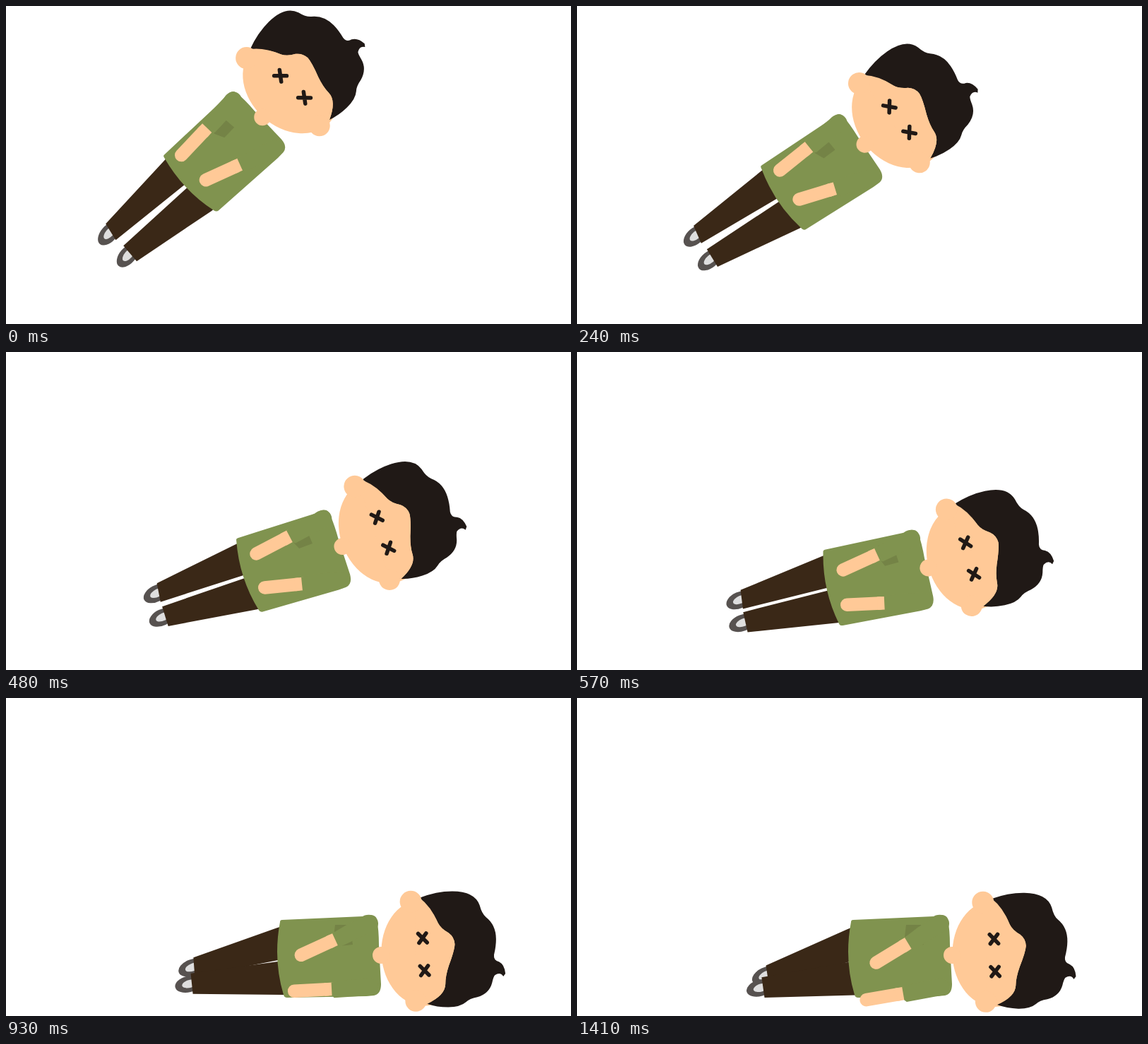
Recreate the animation shown at these times as an HTML page. Size 800x450 px, loop 3330 ms.

```html
<!DOCTYPE html>
<html>
<head>
<meta charset="utf-8">
<style>
  html, body { margin: 0; width: 100%; height: 100%; overflow: hidden; background: #fff; }
  svg { display: block; width: 100%; height: 100%; }
  .skin { fill: #ffc997; }
  .hair { fill: #201916; }
  .shirt { fill: #80934f; }
  .pants { fill: #3a2817; }
  .shoe { fill: #575250; }
  .sock { fill: #dedede; }
  .line { fill: none; stroke-linecap: round; }
</style>
</head>
<body>
<svg viewBox="0 0 800 450">
  <defs>
    <g id="shoe">
      <ellipse class="shoe" rx="19.5" ry="11.5" transform="rotate(-8)"/>
      <ellipse class="sock" cx="2" rx="11.5" ry="5.5" transform="rotate(-8)"/>
    </g>
    <g id="arm">
      <path class="line" d="M-107 0H-60" stroke="#ffc997" stroke-width="18.5"/>
      <path class="skin" d="M-64-9.25H-48V9.25H-64z"/>
      <path class="shirt" d="M-54-9.5L-30-12H0A12 12 0 0 1 0 12L-51 12.5L-54 9.5z"/>
    </g>
    <path id="eye" class="line" d="M-6.3-6.3L6.3 6.3M5-6.8L-5 6.8" stroke="#201916" stroke-width="5.5"/>
  </defs>
  <g id="body">
    <g id="legA">
      <use href="#shoe" x="258.5" y="348"/>
      <path class="pants" d="M264 334.6L388 320L410 318V366L384 365L260 361.2z"/>
    </g>
    <g id="legB">
      <use href="#shoe" x="258.5" y="389"/>
      <path class="pants" d="M263 374.4L385 370.5H410V418H390L263 403.4z"/>
    </g>
    <path class="shirt" d="M388 317Q388 314 391 314L505 309Q510 306 517 307Q524 308 525 313Q528 328 528 350L531 405Q531 419 521 421L510 422L398 424Q394 424 393 420Q378 370 388 317z"/>
    <path fill="#748346" d="M466 321H487L491 349L471 351L464 338z"/>
    <g id="armA"><use href="#arm" x="515" y="319"/></g>
    <g id="armB"><use href="#arm" x="515" y="409"/></g>
    <g id="head">
      <ellipse class="skin" cx="590" cy="361" rx="58.5" ry="75" transform="rotate(-3 590 361)"/>
      <path class="hair" d="M586 283Q610 274 632 274Q664 274 671 294Q674 306 680 311Q694 322 694 342Q694 352 691 364Q690 372 698 374Q706 378 707 391L704 395Q700 388 692 393Q690 395 688 404Q684 419 667 424Q656 426 651 431Q643 438 626 438Q610 438 596 433Q622 421 622 405Q622 394 627 379Q635 358 635.500 349Q635 339 627 333Q616 327 612 319Q602 295 586 283z"/>
      <path class="skin" d="M580 283Q602 295 612 319Q616 327 627 333Q635 339 635.500 349Q635 358 627 379Q622 394 622 405Q622 421 596 433L580 420z"/>
      <circle class="skin" cx="573.500" cy="288.500" r="15.500"/>
      <circle class="skin" cx="580" cy="429" r="15"/>
      <circle class="skin" cx="531" cy="364" r="12"/>
      <use href="#eye" x="590" y="340"/>
      <use href="#eye" x="592.500" y="386"/>
    </g>
  </g>
</svg>
<script>
const LOOP = 3330, STEP = 30, FALL = 900, SETTLE = 1410;
const ease = p => (1 - Math.cos(Math.PI * Math.min(p, 1))) / 2;
const put = (id, transform) => document.getElementById(id).setAttribute('transform', transform);
const turn = (id, angle, x, y) => put(id, `rotate(${angle} ${x} ${y})`);

function draw(now) {
  const t = Math.floor(now % LOOP / STEP) * STEP;
  const up = 1 - ease((t / FALL) ** 0.86);  // share of the fall still to go
  const limp = ease(t / SETTLE);            // limbs and head lag behind
  put('body', `translate(${-21 * up} ${-117 * up}) rotate(${-40.5 * up} 336 518)`);
  turn('legA', -17.3 * limp, 410, 345);
  turn('legB', -8.1 * limp, 410, 396);
  turn('armA', -6 - 25.3 * limp, 515, 319);
  turn('armB', 16 - 25.8 * limp, 515, 409);
  turn('head', 5 * (limp - 0.8), 531, 364);
}

let start;
function tick(now) {
  start ??= now;
  draw(now - start);
  requestAnimationFrame(tick);
}
draw(0);
requestAnimationFrame(tick);
</script>
</body>
</html>
```
